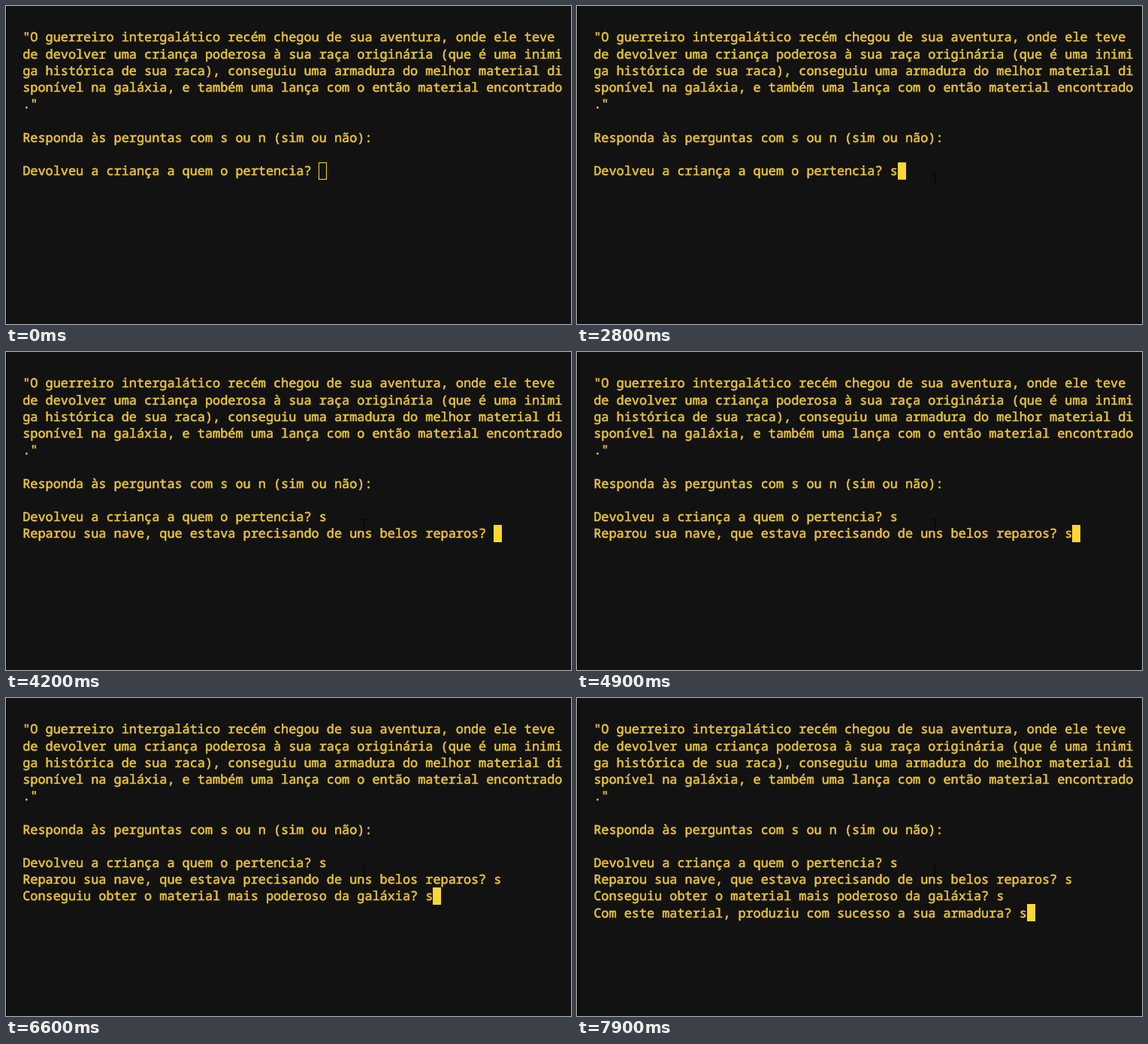
Recreate the animation shown at these times as an HTML page. Size 752 px wide and 423 px high, loop 8 s.

```html
<!DOCTYPE html>
<html lang="pt">
<head>
<meta charset="utf-8">
<style>
html, body { margin: 0; width: 100%; height: 100%; overflow: hidden; background: #121212; }
#edge { position: absolute; left: 0; top: 0; width: 1px; height: 100%; background: #000; }
pre {
  position: absolute; left: 22.2px; top: 30.4px; margin: 0;
  font: 500 16.87px/22.2px "Noto Sans Mono", "DejaVu Sans Mono", monospace;
  font-variant-ligatures: none; text-rendering: geometricPrecision;
  color: #e8c33c; -webkit-text-stroke: .6px #e8c33c;
}
#cursor { position: absolute; box-sizing: border-box; width: 11px; height: 23px; border: 1px solid #fbd734; }
#mouse { position: absolute; left: 0; top: 0; fill: none; stroke: #000; }
</style>
</head>
<body>
<div id="edge"></div>
<pre id="text"></pre>
<div id="cursor"></div>
<svg id="mouse" width="9" height="16"><path d="M1 .5H3.5L4.5 1.5L5.5 .5H8M4.5 1V15M1 15.5H3.5L4.5 14.5L5.5 15.5H8"/></svg>
<script>
const LOOP = 8000, CELL = 10.122, LINE = 22.2, LEFT = 22.2, TOP = 30.4;
const intro = `"O guerreiro intergalático recém chegou de sua aventura, onde ele teve
de devolver uma criança poderosa à sua raça originária (que é uma inimi
ga histórica de sua raca), conseguiu uma armadura do melhor material di
sponível na galáxia, e também uma lança com o então material encontrado
."

Responda às perguntas com s ou n (sim ou não):

`;
// When each question appears and when it is answered
const questions = [
  [0, 2800, "Devolveu a criança a quem o pertencia? "],
  [3100, 4900, "Reparou sua nave, que estava precisando de uns belos reparos? "],
  [5300, 6600, "Conseguiu obter o material mais poderoso da galáxia? "],
  [6900, 7900, "Com este material, produziu com sucesso a sua armadura? "],
];
const FOCUS = 1000;
const path = [[100, 690, 238], [600, 396, 218], [800, 396, 218], [1100, 472, 222]];
const [text, cursor, mouse] = ["text", "cursor", "mouse"].map(id => document.getElementById(id));
let shown;

function mouseAt(t) {
  const i = path.findIndex(p => p[0] > t);
  if (i < 0) return path[path.length - 1].slice(1);
  const [a, b] = [path[i - 1], path[i]];
  const k = (t - a[0]) / (b[0] - a[0]);
  return [1, 2].map(n => Math.round(a[n] + (b[n] - a[n]) * k));
}

function draw(t) {
  const screen = intro + questions.filter(q => t >= q[0])
    .map(([, answered, q]) => q + (t >= answered ? "s" : "")).join("\n");
  if (screen !== shown) text.textContent = shown = screen;

  const lines = screen.split("\n");
  cursor.style.left = Math.floor(LEFT + lines[lines.length - 1].length * CELL) + "px";
  cursor.style.top = Math.floor(TOP + (lines.length - 1) * LINE) + "px";
  cursor.style.background = t >= FOCUS ? "#fbd734" : "none";

  mouse.style.display = t < path[0][0] ? "none" : "block";
  if (t >= path[0][0]) {
    const [x, y] = mouseAt(t);
    mouse.style.transform = `translate(${x}px, ${y}px)`;
  }
}

const start = performance.now();
function frame() {
  const t = (performance.now() - start) % LOOP;
  draw(Math.floor(t / 100) * 100);
  requestAnimationFrame(frame);
}
frame();
</script>
</body>
</html>
```
